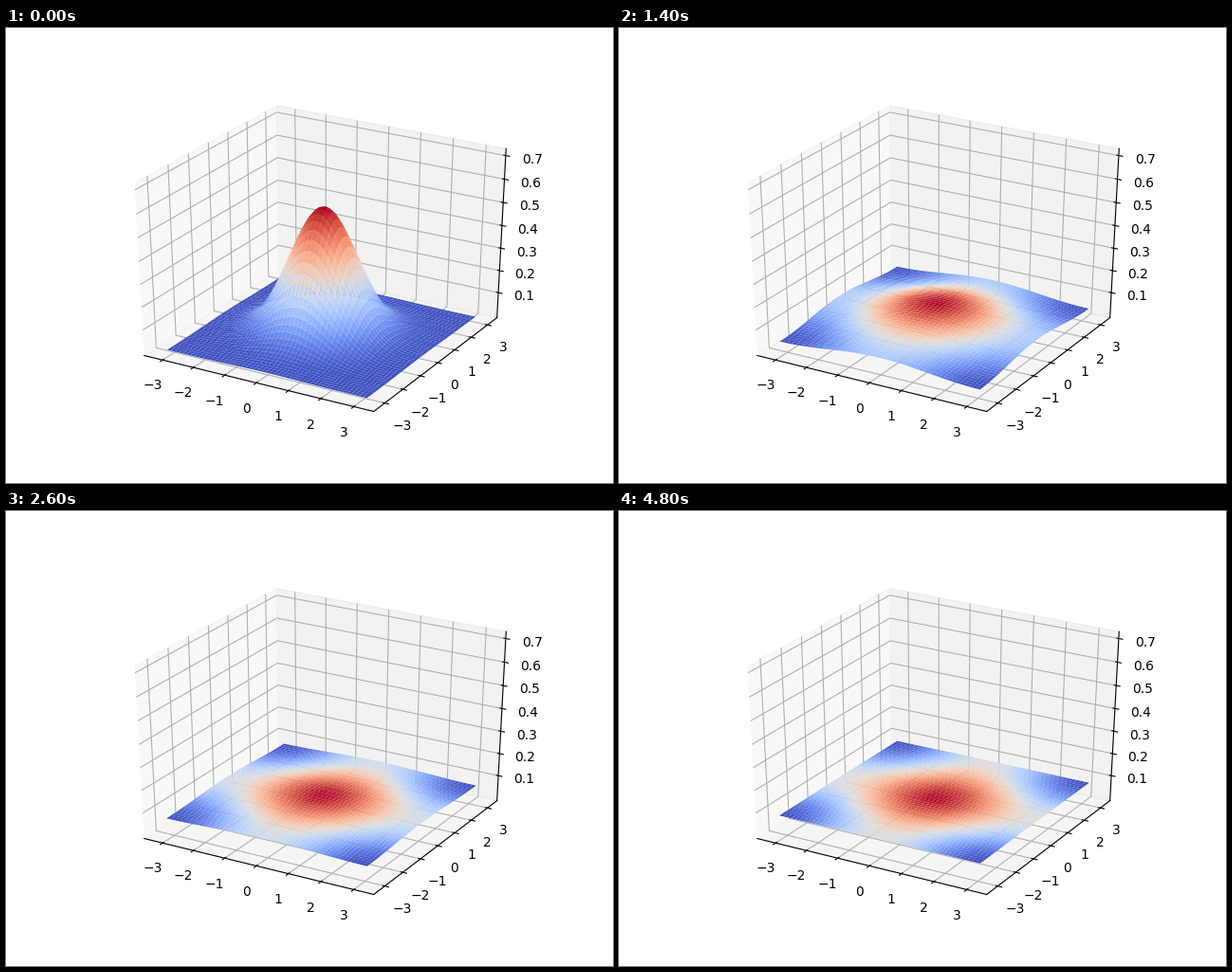
These frames come from a looping animation (640x480 px, 8000 ms). A matplotlib script:

```python
"""Heat spreading from a Gaussian bump on a periodic square, as a 3D surface."""
import matplotlib.pyplot as plt
import numpy as np
from matplotlib.animation import FuncAnimation
from mpl_toolkits.mplot3d.art3d import Poly3DCollection

FRAMES, INTERVAL = 80, 100
LAST_STEP = 48
CELLS = 50
START, STEP = 0.2, 0.1
Z_TOP = 1 / 1.4

axis_points = np.linspace(-np.pi, np.pi, CELLS + 1)
X, Y = np.meshgrid(axis_points, axis_points)


def profile(x, t):
    """Fourier solution of the 1D heat equation for exp(-x**2)."""
    n = np.arange(1, 20)[:, None]
    modes = np.exp(-n**2 * (t + 0.25)) * np.cos(n * x)
    return (1 + 2 * modes.sum(axis=0)) / (2 * np.sqrt(np.pi))


def quads(grid):
    """Corner values of every cell, in drawing order."""
    corners = (grid[:-1, :-1], grid[:-1, 1:], grid[1:, 1:], grid[1:, :-1])
    return np.stack([c.ravel() for c in corners], axis=-1)


def padded(low, high):
    margin = (high - low) / 48
    return low - margin, high + margin


fig = plt.figure(figsize=(6.4, 4.8), dpi=100, facecolor="white")
ax = fig.add_subplot(projection="3d")
# A unit cube stretched over the whole axes rectangle.
ax.apply_aspect = lambda *args, **kwargs: None
ax.set_box_aspect((1, 1, 1), zoom=np.sqrt(3) / 1.8294640721620434)
ax.view_init(elev=30, azim=-60)

side = 1.1 * np.pi
ax.set_xlim(*padded(-side, side))
ax.set_ylim(*padded(-side, side))
ax.set_zlim(*padded(0, Z_TOP))
ax.set_xticks(range(-3, 4))
ax.set_yticks(range(-3, 4))
ax.set_zticks(np.arange(1, 8) / 10)
ax.tick_params(pad=3.98)

quad_x, quad_y = quads(X), quads(Y)
surface = Poly3DCollection(
    np.stack([quad_x, quad_y, 0 * quad_x], axis=-1), cmap="coolwarm")
ax.add_collection3d(surface)


def update(frame):
    t = START + STEP * min(frame, LAST_STEP)
    line = profile(axis_points, t)
    quad_z = quads(np.outer(line, line))
    heights = quad_z.mean(axis=1)
    surface.set_verts(np.stack([quad_x, quad_y, quad_z], axis=-1))
    surface.set_array(heights)
    surface.set_clim(heights.min(), heights.max())
    return [surface]


anim = FuncAnimation(fig, update, frames=FRAMES, interval=INTERVAL,
                     repeat=True, repeat_delay=0)
plt.show()
```
